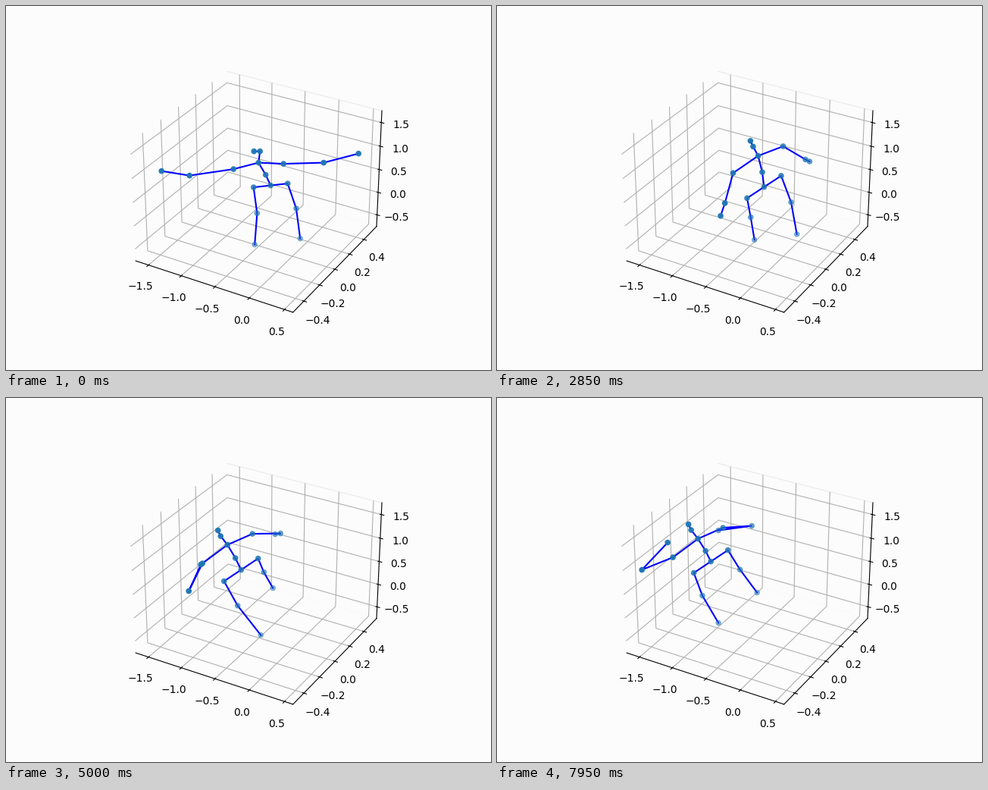
Recreate the animation shown at these times as a matplotlib script. Size 640x480 px, loop 8000 ms.

```python
import matplotlib.pyplot as plt
import numpy as np
from matplotlib.animation import FuncAnimation
from matplotlib.collections import LineCollection
from matplotlib.colors import to_rgb

FRAMES, STEP = 160, 50
W, H = 640, 480
PAPER = "#fcfcfc"
BLUE = to_rgb("C0")

CHAINS = (
    "pelvis r_hip r_knee r_foot",
    "pelvis l_hip l_knee l_foot",
    "pelvis spine thorax nose head",
    "thorax l_shoulder l_elbow l_wrist",
    "thorax r_shoulder r_elbow r_wrist",
)
# nearer joints are more opaque
SHADE = dict(head=.94, nose=.93, thorax=.9, spine=.85, pelvis=.8, hip=.8,
             knee=.6, foot=.47, shoulder=.93, elbow=1, wrist=.95)


def vec(x, y):
    return np.array([x, y], float)


def ease(t, start, end):
    u = np.clip((t - start) / (end - start), 0, 1)
    return u * u * (3 - 2 * u)


def mix(a, b, u):
    return a + (b - a) * u


def glide(*keys, start=1000, step=3450):
    """Rest at the first key until start, then follow a monotone cubic."""
    times = np.array([start, 2250, step, 5000, 6050, 7950], float)
    pos = np.array(keys, float)
    d = np.diff(pos, axis=0) / np.diff(times)[:, None]
    a, b = d[:-1], d[1:]
    same = a * b > 0
    mid = np.where(same, 2 * a * b / np.where(same, a + b, 1), 0)
    m = np.vstack([[0, 0], mid, d[-1]])

    def at(t):
        t = np.clip(t, times[0], times[-1])
        i = min(np.searchsorted(times, t, side="right") - 1, len(times) - 2)
        h = times[i + 1] - times[i]
        u = (t - times[i]) / h
        return (mix(pos[i], pos[i + 1], ease(u, 0, 1))
                + h * u * (1 - u) * ((1 - u) * m[i] - u * m[i + 1]))

    return at


# free joints; elbows and wrists are relative to the thorax
pelvis = glide((349, 236), (357, 239), (343, 236), (310, 226), (296, 218),
               (282, 215))
thorax = glide((333, 206), (354, 196), (328, 198), (292, 193), (288, 178),
               (265, 185))
feet = {
    "r": glide((328, 314), (337, 309), (343, 306), (336, 312), (301, 300),
               (292, 296), step=4250),
    "l": glide((388, 306), (395, 302), (396, 295), (352, 250), (339, 260),
               (343, 256), step=4250),
}
elbows = {
    "r": glide((-91, 17), (-60, 54), (-35, 66), (-51, 61), (-60, 64),
               (-74, 41), start=1200),
    "l": glide((86, 0), (66, 9), (61, -2), (70, -15), (50, -26), (71, -17),
               start=1200),
}
wrists = {
    "r": glide((-128, 11), (-65, 57), (-41, 91), (-35, 26), (-57, 40),
               (-40, 5), start=1200),
    "l": glide((132, -12), (91, 9), (55, 4), (63, -14), (3, -6), (27, -11),
               start=1200),
}


def pose(t):
    """Screen position of every joint, in pixels."""
    p = {"pelvis": pelvis(t), "thorax": thorax(t)}
    p["spine"] = (p["pelvis"] + p["thorax"]) / 2 + vec(1.5, 1)
    p["nose"] = p["thorax"] + mix(vec(2, -15), vec(-9, -11.5),
                                  ease(t, 1450, 3450))
    p["head"] = p["nose"] + mix(vec(-8, 0), vec(-3.5, -7.5),
                                ease(t, 1200, 2250))

    # hips and shoulders turn as bars about the trunk
    hip = vec(22.5, -2.5 - 12.5 * ease(t, 1200, 3000))
    shoulder = vec(33, -3.5 - 16 * ease(t, 1200, 3300))
    kick = 13 * np.exp(-((t - 6050) / 550) ** 2)
    bend = {"r": 4 - 7 * ease(t, 2250, 3450) - kick,
            "l": 4 - 5 * ease(t, 3450, 5000)}
    for side, sign in (("r", -1), ("l", 1)):
        h = p[side + "_hip"] = p["pelvis"] + sign * hip
        f = p[side + "_foot"] = feet[side](t)
        p[side + "_knee"] = mix(h, f, .44) + vec(bend[side], 1)
        p[side + "_shoulder"] = p["thorax"] + vec(0, 5) + sign * shoulder
        p[side + "_elbow"] = p["thorax"] + elbows[side](t)
        p[side + "_wrist"] = p["thorax"] + wrists[side](t)
    return {name: xy + vec(.2, .6) for name, xy in p.items()}


def tint(name, t):
    alpha = SHADE[name.split("_")[-1]]
    if name in ("l_shoulder", "l_elbow", "l_wrist"):
        alpha -= (.2 if name == "l_shoulder" else .4) * ease(t, 1450, 3450)
    return (*BLUE, alpha)


fig = plt.figure(figsize=(W / 100, H / 100), dpi=100, facecolor=PAPER)

# box with ticks and grid
box = fig.add_subplot(projection="3d", facecolor=PAPER)
box.set_xlim(-1.698, .619)
box.set_ylim(-.534, .583)
box.set_zlim(-.761, 1.747)
box.set_xticks(np.arange(-1.5, .6, .5))
box.set_yticks(np.linspace(-.4, .4, 5))
box.set_zticks(np.arange(-.5, 1.6, .5))
for axis in (box.xaxis, box.yaxis, box.zaxis):
    axis.set_pane_color(PAPER)
box.yaxis.pane.set_edgecolor("#eeeeee")

# the figure is laid over the box in screen pixels
stage = fig.add_axes([0, 0, 1, 1], zorder=5)
stage.set_xlim(0, W)
stage.set_ylim(H, 0)
stage.axis("off")
limbs = LineCollection([], colors="b", linewidths=1.5, capstyle="projecting")
stage.add_collection(limbs, autolim=False)
names = list(pose(0))
dots = stage.scatter(*np.transpose(list(pose(0).values())), s=20,
                     linewidths=1, zorder=3)


def draw(frame):
    t = frame * STEP
    p = pose(t)
    limbs.set_segments([[p[n] for n in chain.split()] for chain in CHAINS])
    colors = [tint(n, t) for n in names]
    dots.set_offsets([p[n] for n in names])
    dots.set_facecolor(colors)
    dots.set_edgecolor(colors)
    return limbs, dots


anim = FuncAnimation(fig, draw, frames=FRAMES, interval=STEP,
                     init_func=lambda: draw(0), repeat=True, repeat_delay=0)
plt.show()
```
